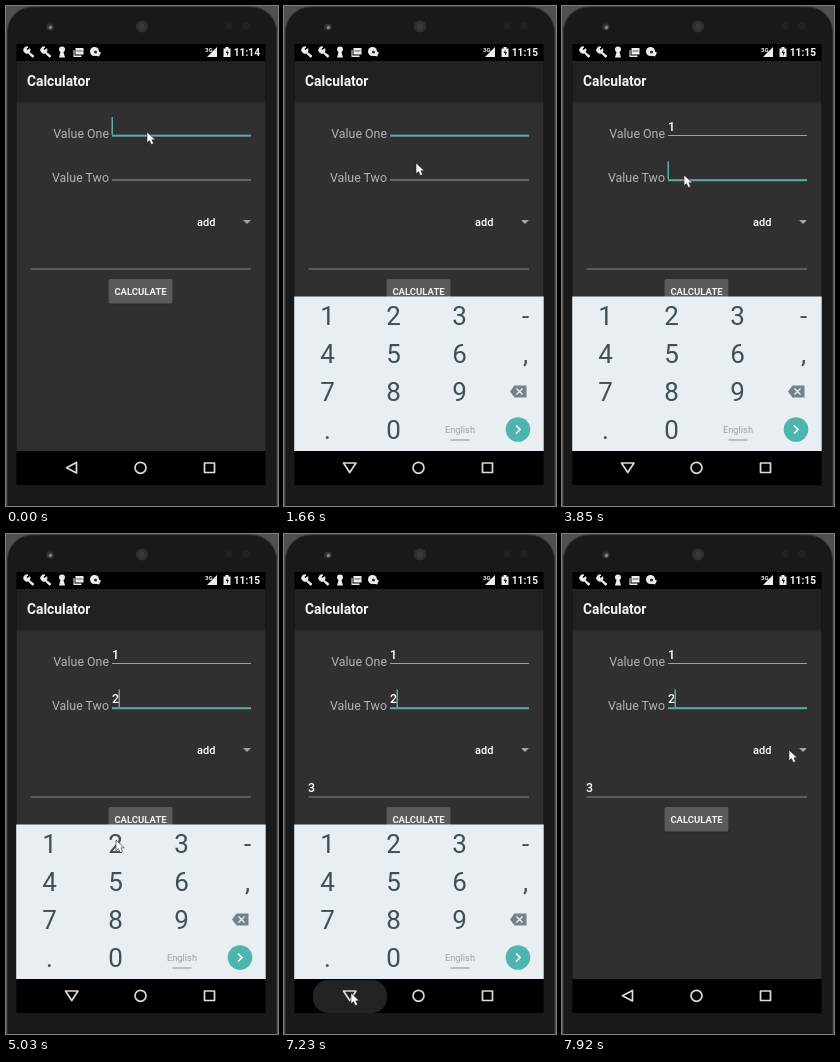
Write an HTML page that moves like this. It is 272x500 px and loops after 8000 ms.

```html
<!DOCTYPE html>
<html lang="en">
<head>
<meta charset="utf-8">
<title>Calculator demo</title>
<style>
  html, body { margin: 0; width: 100%; height: 100%; overflow: hidden; background: #505050; }
  svg { display: block; width: 272px; height: 500px; font-family: Roboto, "Open Sans", sans-serif; }
  .label { font-size: 12.4px; fill: #b4b4b4; text-anchor: end; }
  .value { font-size: 12.4px; font-weight: 500; fill: #fff; }
  .medium { font-weight: 500; fill: #fff; }
  .bold { font-weight: 700; fill: #f4f4f4; }
  .keys { font-size: 26px; fill: #414f57; text-anchor: middle; }
  .nav { fill: none; stroke: #dcdcdc; stroke-width: 1.7; stroke-linejoin: round; }
</style>
</head>
<body>
<svg viewBox="0 0 272 500">
  <defs>
    <linearGradient id="shade" x2="0" y2="1">
      <stop offset="0" stop-opacity=".3"/><stop offset="1" stop-opacity="0"/>
    </linearGradient>
    <path id="wrench" d="M-5-3.5A3.3 3.3 0 0 1-1-5L-2.8-3.2-1.2-1.6 .6-3.4A3.3 3.3 0 0 1 .3 .2L5 4 3.6 5.4-.7 1A3.3 3.3 0 0 1-5-3.5Z" fill="#eee" stroke="#eee" stroke-width=".9"/>
  </defs>

  <g id="phone">
    <rect width="272" height="500" fill="#505050"/>
    <rect x="1.5" y="1" width="269" height="540" rx="25" fill="#191919" stroke="#2c2c2c"/>
    <circle cx="136" cy="20.500" r="6" fill="#303030"/>
    <circle cx="136" cy="20.500" r="3" fill="#3b3b3d"/>
    <circle cx="44" cy="21" r="3.600" fill="#34353a"/>
    <circle cx="44.500" cy="21.500" r="1.700" fill="#80858f"/>
    <circle cx="223" cy="20" r="3.500" fill="#212121"/>
    <circle cx="240" cy="20" r="3.500" fill="#212121"/>
  </g>

  <g id="screen">
    <rect x="10.500" y="38" width="249" height="441" fill="#000"/>
    <rect x="10.500" y="55" width="249" height="40" fill="#212121"/>
    <rect x="10.500" y="95" width="249" height="350" fill="#303030"/>
    <rect x="10.500" y="95" width="249" height="4" fill="url(#shade)"/>
    <text class="bold" x="21" y="79.500" font-size="13.800">Calculator</text>
  </g>

  <g id="status" fill="#eee">
    <use href="#wrench" x="23" y="46"/>
    <use href="#wrench" x="40" y="46"/>
    <path d="M53 43.500a3 3 0 1 1 6 0q0 1.500-1.500 2.500L59 51.500H53L54.500 46Q53 45 53 43.500Z"/>
    <path d="M69.500 42h8v6.500h-8zM67.500 44h1v5.500h7V51h-8z"/>
    <path d="M70.500 45h6" stroke="#555"/>
    <circle cx="88.500" cy="45.500" r="4.500"/>
    <path d="M91 45l4 1.500-2 4-4-1z"/>
    <circle cx="89.500" cy="46" r="1.600" fill="#333"/>
    <text x="199" y="45.500" font-size="6" font-weight="700">3G</text>
    <path d="M211 41v10h-10z"/>
    <path d="M217.500 42.500h2V41h3v1.500h2V51h-7z"/>
    <path d="M221.500 43.500l-2 3.500h1.500v3l2-4h-1.500z" fill="#222"/>
    <text id="clock" class="bold" x="254" y="50" font-size="10.200" text-anchor="end"></text>
  </g>

  <g id="form">
    <text class="label" x="103" y="132">Value One</text>
    <text class="label" x="103" y="176.300">Value Two</text>
    <rect id="line1" x="106" width="139"/>
    <rect id="line2" x="106" width="139"/>
    <text id="value1" class="value" x="106" y="124.500">1</text>
    <text id="value2" class="value" x="106" y="168.800">2</text>
    <rect id="caret" width="1.500" height="17.500" fill="#62aaa4"/>
    <text class="medium" x="191" y="220" font-size="11">add</text>
    <path d="M237 214h8l-4 4z" fill="#a5a5a5"/>
    <rect x="24.500" y="262.500" width="220.500" height="1" fill="#858585"/>
    <text id="result" class="value" x="24" y="258">3</text>
    <rect x="102" y="274" width="65" height="24.500" rx="2" fill="#262626"/>
    <rect id="button" x="102.500" y="273" width="64" height="24.500" rx="1.500"/>
    <text class="bold" x="134.500" y="289" font-size="9.500" text-anchor="middle">CALCULATE</text>
  </g>

  <rect id="ripple" x="29" y="446" width="74" height="33" rx="15" fill="#232323"/>
  <g id="keyboard">
    <rect x="10.200" y="290.500" width="249.500" height="154.500" fill="#e9eef2"/>
    <rect id="press" y="294" width="62" height="31" rx="2" fill="#cfd7dc"/>
    <g id="keys" class="keys"></g>
    <path d="M226 385.500l4.500-6H242.500v12H230.500z" fill="#75828a"/>
    <path d="M232.500 382.500l6 6m0-6l-6 6" stroke="#e9eef2" stroke-width="1.400"/>
    <text x="176" y="426.500" font-size="9.300" fill="#98a2a8" text-anchor="middle">English</text>
    <rect x="166.500" y="433.500" width="19" height="1" fill="#87939a"/>
    <circle cx="234" cy="423.500" r="12.300" fill="#4db6ac"/>
    <path d="M232 419.500l4 4-4 4" fill="none" stroke="#fff" stroke-width="1.700"/>
  </g>
  <g class="nav">
    <path id="back"/>
    <circle cx="134.500" cy="461.800" r="5.500"/>
    <rect x="198.500" y="457" width="10" height="9.500"/>
  </g>
  <path id="mouse" d="M0 0V10.800L2.500 8.600 4.300 12.500 6.600 11.500 4.900 7.800H8.300Z" fill="#fff" stroke="#222" stroke-width=".6"/>
</svg>

<script>
const LOOP = 8000;
const STEP = 130;        // ms between screen updates
const GLIDE = 2 * STEP;  // time of one mouse movement
const BLINK = 500;

// Moments of the demo, in ms.
const MINUTE = 414, TAP_ONE = 1390, KEYS_IN = 1510, KEYS_UP = 1660;
const TYPE_ONE = 3300, TAP_TWO = 3850, TYPE_TWO = 4760, CALCULATE = 5550;
const TAP_BACK = 7110, KEYS_OUT = 7380, KEYS_GONE = 7500;

// Where the mouse has arrived, and when.
const STOPS = [
  { at: 0, x: 141, y: 126 },
  { at: MINUTE, x: 152, y: 211 },
  { at: 810, x: 127, y: 123 },
  { at: KEYS_UP, x: 132, y: 157 },
  { at: 2110, x: 78, y: 272 },
  { at: 2500, x: 43, y: 311 },
  { at: 3570, x: 122, y: 169 },
  { at: 4300, x: 110, y: 306 },
  { at: 5400, x: 144, y: 284 },
  { at: 6260, x: 218, y: 220 },
  { at: 6900, x: 67, y: 459 },
  { at: KEYS_OUT, x: 202, y: 260 },
  { at: KEYS_GONE, x: 232, y: 214 },
  { at: 7900, x: 227, y: 216 }
];

const $ = id => document.getElementById(id);
const set = (id, attrs) => {
  for (const name in attrs) $(id).setAttribute(name, attrs[name]);
};
const show = (id, on) => set(id, { visibility: on ? 'visible' : 'hidden' });

$('keys').innerHTML = ['123-', '456,', '789', '.0'].map((row, r) =>
  [...row].map((key, c) => `<text x="${43.5 + c * 66}" y="${319.3 + r * 38}">${key}</text>`).join('')
).join('');

function mouseAt(t) {
  const next = STOPS.findIndex(stop => stop.at > t);
  if (next < 0) return STOPS[STOPS.length - 1];
  const from = STOPS[next - 1], to = STOPS[next];
  const start = Math.max(from.at, to.at - GLIDE);
  const k = Math.max(0, Math.floor((t - start) / STEP) * STEP / (to.at - start));
  return { x: from.x + (to.x - from.x) * k, y: from.y + (to.y - from.y) * k };
}

// Every focus or keystroke restarts the blinking.
function caretOn(t) {
  const restart = [TYPE_TWO, TAP_TWO, TYPE_ONE].find(at => at <= t) ?? -190;
  return Math.floor((t - restart) / BLINK) % 2 === 0;
}

function drawLine(id, y, focused) {
  set(id, focused
    ? { y: y - 1, height: 2, fill: '#62aaa4' }
    : { y: y - 0.7, height: 1, fill: '#a0a0a0' });
}

function draw(t) {
  const between = (from, to) => t >= from && t < to;
  const second = t >= TAP_TWO;
  const typed = t >= (second ? TYPE_TWO : TYPE_ONE);

  $('clock').textContent = t < MINUTE ? '11:14' : '11:15';
  drawLine('line1', 129.7, !second);
  drawLine('line2', 174.2, second);
  show('value1', t >= TYPE_ONE);
  show('value2', t >= TYPE_TWO);
  show('result', t >= CALCULATE);
  show('caret', caretOn(t));
  set('caret', { x: typed ? 112.5 : 105.5, y: second ? 155.5 : 111 });
  set('button', { fill: between(CALCULATE, CALCULATE + 3 * STEP) ? '#707070' : '#5a5a5a' });

  const presence = between(KEYS_UP, KEYS_OUT) ? 1 : 0.7;
  show('keyboard', between(KEYS_IN, KEYS_GONE));
  set('keyboard', { opacity: presence, transform: `translate(0 ${18 * (1 - presence)})` });
  const pressed = [TYPE_ONE, TYPE_TWO].findIndex(at => between(at - STEP, at + STEP / 2));
  set('press', { x: 13 + 66 * pressed, opacity: pressed < 0 ? 0 : 1 });

  show('ripple', between(TAP_BACK, KEYS_GONE));
  set('back', {
    d: between(TAP_ONE, KEYS_OUT) ? 'M59.5 457H72L65.750 466.500Z' : 'M70.500 456.500V467L60.500 461.800Z'
  });
  const { x, y } = mouseAt(t);
  set('mouse', { transform: `translate(${x} ${y})` });
}

function tick() {
  draw(performance.now() % LOOP);
  requestAnimationFrame(tick);
}
tick();
</script>
</body>
</html>
```
